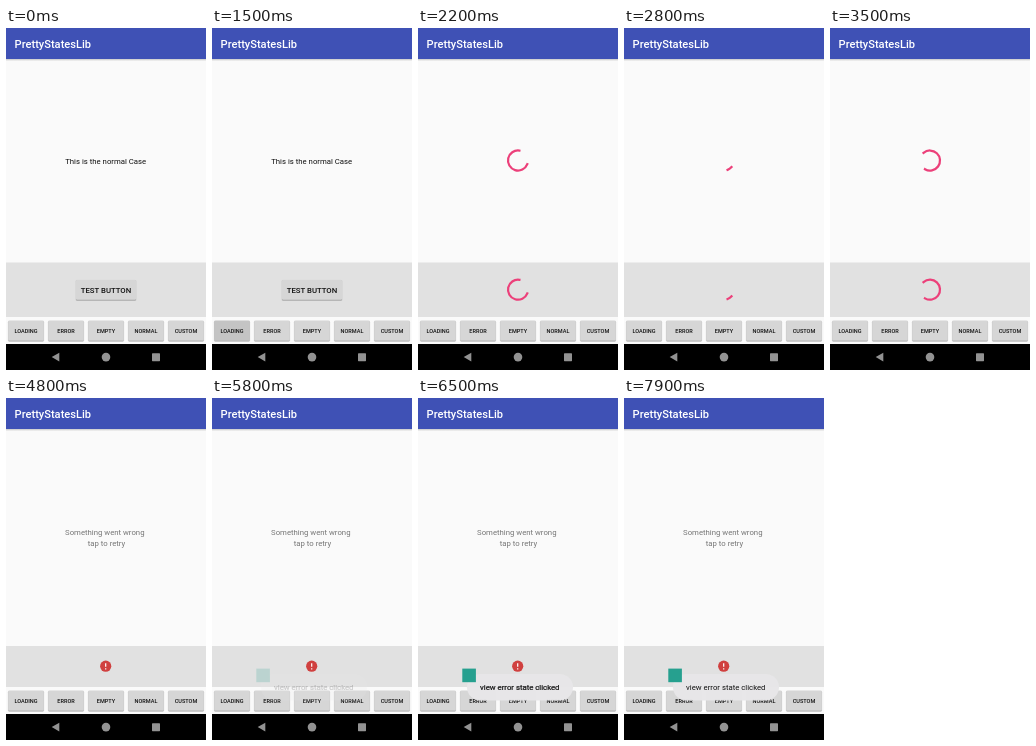
An HTML page for the animation above (8000 ms loop, 200 px wide and 342 px high).

```html
<!DOCTYPE html>
<html lang="en">
<head>
<meta charset="utf-8">
<title>PrettyStatesLib</title>
<style>
  html, body { margin: 0; width: 100%; height: 100%; overflow: hidden; background: #fafafa; }
  svg { display: block; width: 100vw; height: 100vh; }
  text { font: 400 7.78px Roboto, sans-serif; fill: #111; text-anchor: middle; }
  .title { font-size: 11.1px; font-weight: 500; fill: #fff; text-anchor: start; }
  .label { font-weight: 500; }
  .small { font-size: 5.56px; font-weight: 500; }
  .hint { fill: #757575; }
  .spin { fill: none; stroke: #ec407a; stroke-width: 2.25; stroke-linecap: square; }
</style>
</head>
<body>
<svg viewBox="0 0 200 342" id="stage">
  <defs>
    <linearGradient id="fade" x2="0" y2="1">
      <stop stop-color="#000" stop-opacity=".2"/>
      <stop offset="1" stop-color="#000" stop-opacity="0"/>
    </linearGradient>
  </defs>
  <rect width="200" height="342" fill="#fafafa"/>
  <rect y="31" width="200" height="2.2" fill="url(#fade)"/>
  <rect width="200" height="31" fill="#3f51b5"/>
  <text class="title" x="8.6" y="19.7" textLength="">PrettyStatesLib</text>

  <rect id="panel" width="200" fill="#e1e1e1"/>

  <g id="normal">
    <text x="99.7" y="135.6">This is the normal Case</text>
    <g id="test"></g>
  </g>

  <g id="loading">
    <path class="spin" transform="translate(100 132.5)"/>
    <path class="spin" transform="translate(100 261.7)"/>
  </g>

  <g id="error">
    <text class="hint" x="98.8" y="136.6">Something went wrong</text>
    <text class="hint" x="100.5" y="148">tap to retry</text>
    <circle cx="99.7" cy="268.2" r="5.6" fill="#d0403f"/>
    <path d="M99.7 265.3v3.4M99.7 270.2v1.2" stroke="#fff" stroke-width="1.2"/>
  </g>

  <g id="row"></g>

  <rect y="316" width="200" height="26" fill="#000"/>
  <g fill="#929292">
    <path d="M53.3 324.8v8.6l-7.6-4.3z"/>
    <circle cx="100" cy="329.1" r="4.3"/>
    <rect x="146" y="325.2" width="8" height="8" rx=".6"/>
  </g>

  <g id="toast">
    <rect x="49" y="276" width="106" height="26.4" rx="13.2" fill="#e8e7e9" fill-opacity=".97"/>
    <rect x="44.3" y="270.6" width="13.6" height="13.6" fill="#26a08f"/>
    <text id="msg" x="101.8" y="291.8" stroke="#111">view error state clicked</text>
  </g>
</svg>
<script>
const LOOP = 8000, STEP = 100;
const LOAD_AT = 1700, SPIN_AT = 1715, ERROR_AT = 4500, TOAST_AT = 5800;
const CYCLE = 1333, TURN = 4444, RADIUS = 10;
const $ = id => document.getElementById(id);
const clamp = v => Math.max(0, Math.min(1, v));

document.querySelector('.title').removeAttribute('textLength');

function button(x, y, w, h, label, cls) {
  return `<rect x="${x - .4}" y="${y + .3}" width="${w + .8}" height="${h + 1}" rx="1.4" fill="#000" opacity=".1"/>
    <rect x="${x}" y="${y + .5}" width="${w}" height="${h + .3}" rx="1.1" fill="#000" opacity=".2"/>
    <rect x="${x}" y="${y}" width="${w}" height="${h}" rx="1.1" fill="#d6d6d6"/>
    <rect class="press" x="${x}" y="${y}" width="${w}" height="${h}" rx="1.1" opacity="0"/>
    <text class="${cls}" x="${x + w / 2}" y="${y + h / 2 + (cls === 'small' ? 2 : 2.8)}">${label}</text>`;
}

$('test').innerHTML = button(70, 251.8, 60, 20, 'TEST BUTTON', 'label');
$('row').innerHTML = ['LOADING', 'ERROR', 'EMPTY', 'NORMAL', 'CUSTOM']
  .map((s, i) => button(2.2 + 40 * i, 292.6, 35.6, 20, s, 'small')).join('');
const press = $('row').querySelectorAll('.press');
const spins = document.querySelectorAll('.spin');

function bezier(a, b, c, d, s) {
  const r = 1 - s;
  return r * r * r * a + 3 * r * r * s * b + 3 * r * s * s * c + s * s * s * d;
}

// Eased 0..1 progress on a cubic whose x controls are xs and y controls 0, 0, 1, 1
function ease(xs, x) {
  if (x <= xs[0]) return 0;
  if (x >= xs[3]) return 1;
  let lo = 0, hi = 1;
  for (let i = 0; i < 24; i++) {
    const mid = (lo + hi) / 2;
    if (bezier(...xs, mid) < x) lo = mid; else hi = mid;
  }
  return bezier(0, 0, 1, 1, lo);
}

function arc(t) {
  const p = (t % CYCLE) / CYCLE;
  const base = 720 * t / TURN + 90 * p;
  const from = base + 270 * ease([.5, .7, .6, 1], p);
  const to = Math.max(from + .5, base + 270 * ease([0, .2, .1, .5], p));
  const at = deg => {
    const a = (deg - 90) * Math.PI / 180;
    return `${(RADIUS * Math.cos(a)).toFixed(3)} ${(RADIUS * Math.sin(a)).toFixed(3)}`;
  };
  return `M${at(from)}A${RADIUS} ${RADIUS} 0 ${to - from > 180 ? 1 : 0} 1 ${at(to)}`;
}

const show = (id, on) => $(id).setAttribute('visibility', on ? 'visible' : 'hidden');
const pulse = (t, start, len) => t < start || t > start + len ? 0 : .1 * (1 - (t - start) / len);

function draw(t) {
  const loading = t >= LOAD_AT && t < ERROR_AT, error = t >= ERROR_AT;
  show('normal', t < LOAD_AT);
  show('loading', loading);
  show('error', error);

  const top = error ? 248 : 234.5;
  $('panel').setAttribute('y', top);
  $('panel').setAttribute('height', 289 - top);

  if (loading) {
    const d = arc(Math.max(0, t - SPIN_AT));
    spins.forEach(s => s.setAttribute('d', d));
  }
  press[0].setAttribute('opacity', pulse(t, 1400, 600));
  press[1].setAttribute('opacity', pulse(t, 4100, 400));

  $('toast').setAttribute('opacity', t < TOAST_AT ? 0 : clamp(.2 + (t - TOAST_AT) / 500));
  $('msg').setAttribute('stroke-width', t < 7800 ? .22 : 0);
}

const begin = performance.now();
function tick() {
  const t = (performance.now() - begin) % LOOP;
  draw(Math.floor(t / STEP) * STEP);
  requestAnimationFrame(tick);
}
tick();
</script>
</body>
</html>
```
